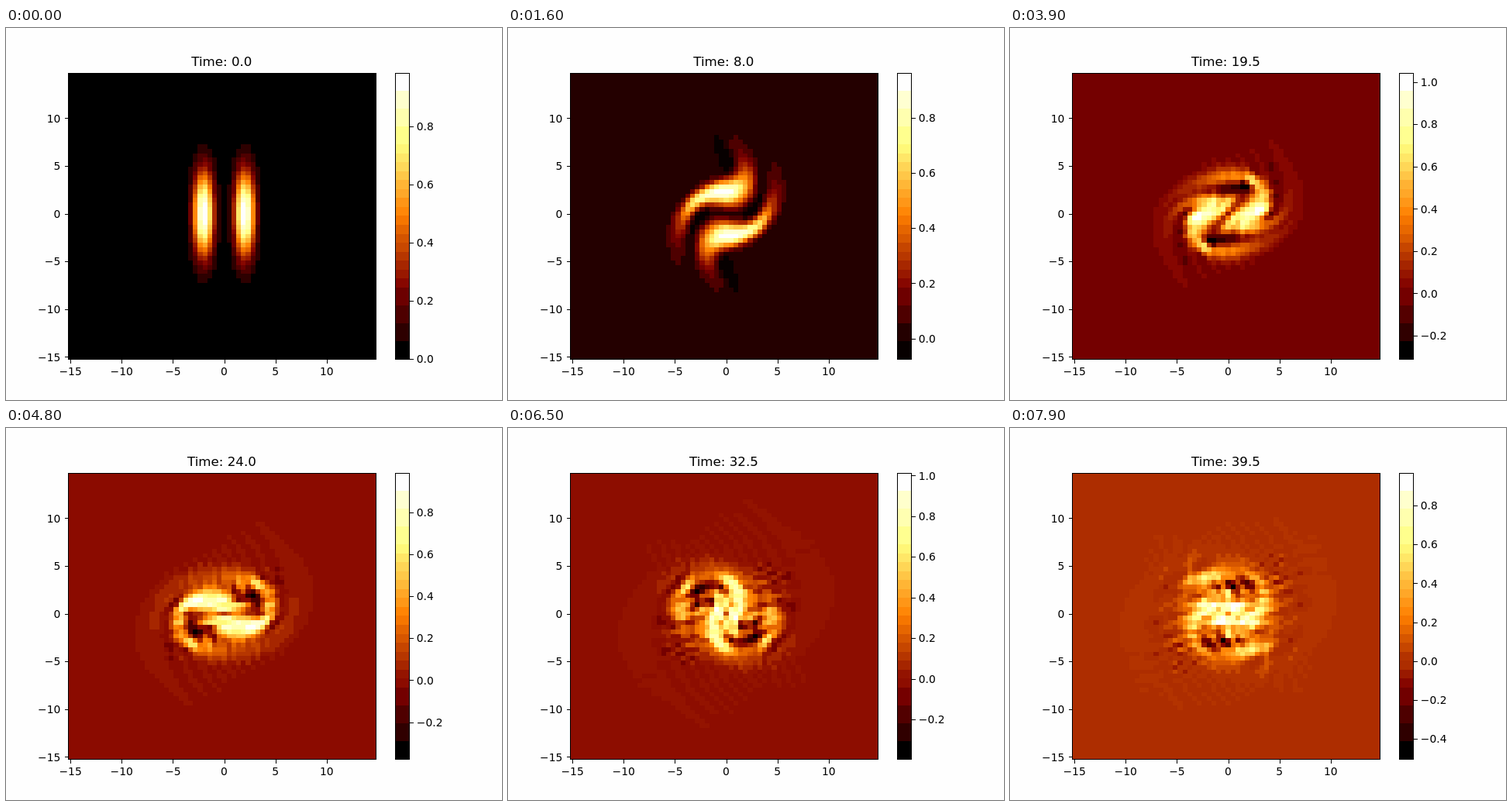
An HTML page with a canvas that plays this animation: 640x480 px, repeating every 8 s.

```html
<!DOCTYPE html>
<html lang="en">
<head>
<meta charset="utf-8">
<title>Vorticity field</title>
<style>
  html, body { margin: 0; width: 640px; height: 480px; overflow: hidden; background: #fefefe; }
  canvas, svg { position: absolute; left: 0; top: 0; display: block; }
  text { font: 13.89px "DejaVu Sans", sans-serif; }
  #title { font-size: 16.67px; }
  path { fill: none; stroke: #000; stroke-width: 1; shape-rendering: crispEdges; }
</style>
</head>
<body>
<canvas id="field" width="640" height="480"></canvas>
<svg width="640" height="480" viewBox="0 0 640 480">
  <path d="M80.5 58.5H477.5V427.5H80.5ZM502.5 58.5H520.5V427.5H502.5Z"/>
  <g id="axes"></g>
  <g id="scale"></g>
  <text id="title" x="278.4" y="49" text-anchor="middle"></text>
</svg>
<script>
const N = 64, SIZE = N * N, LENGTH = 30, DX = LENGTH / N;
const FRAMES = 80, FRAME_MS = 100, FRAME_DT = 0.5, SUBSTEPS = 2, VISCOSITY = 0.001;
const PLOT = { x: 80, y: 57.6, w: 396.8, h: 369.6 };
const BOTTOM = PLOT.y + PLOT.h;
const byId = id => document.getElementById(id);

// --- Fast Fourier transform of one line of N values ---
const cosT = Float64Array.from({ length: N }, (_, i) => Math.cos(2 * Math.PI * i / N));
const sinT = Float64Array.from({ length: N }, (_, i) => Math.sin(2 * Math.PI * i / N));
const reversed = Array.from({ length: N }, (_, i) =>
  parseInt(i.toString(2).padStart(6, "0").split("").reverse().join(""), 2));

function fftLine(re, im, base, stride, sign) {
  for (let i = 0; i < N; i++) {
    const j = reversed[i];
    if (j <= i) continue;
    const a = base + i * stride, b = base + j * stride;
    const tr = re[a], ti = im[a];
    re[a] = re[b]; im[a] = im[b];
    re[b] = tr; im[b] = ti;
  }
  for (let half = 1; half < N; half *= 2) {
    const turn = N / (2 * half);
    for (let k = 0; k < half; k++) {
      const c = cosT[k * turn], s = sign * sinT[k * turn];
      for (let i = k; i < N; i += 2 * half) {
        const a = base + i * stride, b = a + half * stride;
        const tr = re[b] * c - im[b] * s, ti = re[b] * s + im[b] * c;
        re[b] = re[a] - tr; im[b] = im[a] - ti;
        re[a] += tr; im[a] += ti;
      }
    }
  }
}

function fft2(re, im, sign) {
  for (let i = 0; i < N; i++) fftLine(re, im, i * N, 1, sign);
  for (let i = 0; i < N; i++) fftLine(re, im, i, N, sign);
}

// --- Vorticity equation on a periodic square ---
const waveNumber = i => 2 * Math.PI / LENGTH * (i < N / 2 ? i : i - N);
const inverseLaplace = Float64Array.from({ length: SIZE }, (_, n) => {
  const k2 = waveNumber(n % N) ** 2 + waveNumber(Math.floor(n / N)) ** 2;
  return k2 ? -1 / (k2 * SIZE) : 0;
});
const psi = new Float64Array(SIZE), psiIm = new Float64Array(SIZE);

function slope(w, out) {
  psi.set(w);
  psiIm.fill(0);
  fft2(psi, psiIm, -1);
  for (let n = 0; n < SIZE; n++) {
    psi[n] *= inverseLaplace[n];
    psiIm[n] *= inverseLaplace[n];
  }
  fft2(psi, psiIm, 1);
  const grad = 1 / (4 * DX * DX), diffuse = VISCOSITY / (DX * DX);
  for (let j = 0; j < N; j++) {
    const row = j * N, up = (j + 1) % N * N, down = (j + N - 1) % N * N;
    for (let i = 0; i < N; i++) {
      const e = row + (i + 1) % N, v = row + (i + N - 1) % N, n = up + i, s = down + i;
      out[row + i] =
        grad * ((psi[e] - psi[v]) * (w[n] - w[s]) - (psi[n] - psi[s]) * (w[e] - w[v])) +
        diffuse * (w[e] + w[v] + w[n] + w[s] - 4 * w[row + i]);
    }
  }
}

const stage = new Float64Array(SIZE);
const slopes = [0, 1, 2, 3].map(() => new Float64Array(SIZE));

function stepRK4(w, dt) {
  const [a, b, c, d] = slopes;
  const advance = (k, h) => {
    for (let n = 0; n < SIZE; n++) stage[n] = w[n] + h * k[n];
    return stage;
  };
  slope(w, a);
  slope(advance(a, dt / 2), b);
  slope(advance(b, dt / 2), c);
  slope(advance(c, dt), d);
  for (let n = 0; n < SIZE; n++) w[n] += dt / 6 * (a[n] + 2 * b[n] + 2 * c[n] + d[n]);
}

function simulate() {
  const w = Float64Array.from({ length: SIZE }, (_, n) => {
    const x = n % N * DX - LENGTH / 2, y = Math.floor(n / N) * DX - LENGTH / 2;
    const ribbon = cx => Math.exp(-((x - cx) ** 2) - y * y / 20);
    return ribbon(2) + ribbon(-2);
  });
  const states = [w.slice()];
  while (states.length < FRAMES) {
    for (let s = 0; s < SUBSTEPS; s++) stepRK4(w, FRAME_DT / SUBSTEPS);
    states.push(w.slice());
  }
  return states;
}

// --- Colours: black-red-yellow-white ramp, merged into coarse RGB bins ---
const ramp = Array.from({ length: 256 }, (_, i) =>
  [0, 0.5, 1].map(shift => Math.floor(255 * Math.min(1, Math.max(0, 2 * i / 255 - shift)))));
const binOf = ([r, g, b]) => (r >> 5) << 7 | (g >> 4) << 3 | b >> 5;
const levelOf = share => Math.min(255, Math.max(0, Math.floor(share * 256)));

function mergedColours(counts) {
  const bins = new Map();
  const add = (rgb, count) => {
    const key = binOf(rgb), bin = bins.get(key) || [0, 0, 0, 0];
    rgb.forEach((v, c) => bin[c] += v * count);
    bin[3] += count;
    bins.set(key, bin);
  };
  add([0, 0, 0], 3000);          // lines and lettering
  add([255, 255, 255], 150000);  // page
  add([241, 241, 241], 1500);    // soft line edges
  ramp.forEach((rgb, i) => counts[i] && add(rgb, counts[i]));
  return ramp.map(rgb => {
    const bin = bins.get(binOf(rgb));
    return bin ? `rgb(${[0, 1, 2].map(c => Math.floor(bin[c] / bin[3]))})` : "#000";
  });
}

// --- Drawing ---
const ctx = byId("field").getContext("2d");
const edgeX = Array.from({ length: N + 1 }, (_, i) => Math.round(PLOT.x + PLOT.w * i / N));
const edgeY = Array.from({ length: N + 1 }, (_, j) => Math.round(BOTTOM - PLOT.h * j / N));
const BAR = { x: 502, w: 18, top: 58, bottom: 427 };
const snap = v => Math.floor(v + 0.5) + 0.5;
const label = v => String(v).replace("-", "\u2212");
const tickPath = d => `<path d="${d}"/>`;
const textAt = (x, y, anchor, s) => `<text x="${x}" y="${y}" text-anchor="${anchor}">${s}</text>`;
const besideTick = y => Math.round(y + 5.2);

function drawAxes() {
  let out = "";
  for (let v = -15; v <= 10; v += 5) {
    const share = (v + LENGTH / 2 + DX / 2) / LENGTH;
    const x = PLOT.x + PLOT.w * share, y = BOTTOM - PLOT.h * share;
    out += tickPath(`M${snap(x)} 428V432.5M80 ${snap(y)}H75.5`) +
      textAt(x, 448, "middle", label(v)) + textAt(70.3, besideTick(y), "end", label(v));
  }
  byId("axes").innerHTML = out;
}

function drawScale(low, high) {
  let out = "";
  for (let i = Math.ceil(low * 5 - 1e-6); i <= high * 5; i++) {
    const y = BOTTOM - PLOT.h * (i / 5 - low) / (high - low);
    out += tickPath(`M521 ${snap(y)}H525.5`) +
      textAt(529.8, besideTick(y), "start", label(((i || 0) / 5 + 0).toFixed(1)));
  }
  byId("scale").innerHTML = out;
}

function drawFrame(index) {
  const w = states[index];
  let low = Infinity, high = -Infinity;
  for (const v of w) {
    low = Math.min(low, v);
    high = Math.max(high, v);
  }
  const levels = Array.from(w, v => levelOf((v - low) / (high - low)));
  const barLevel = y => levelOf((BOTTOM - y - 0.5) / PLOT.h);
  const counts = new Float64Array(256);
  const eachCell = visit => levels.forEach((level, n) => {
    const i = n % N, j = Math.floor(n / N);
    visit(level, edgeX[i], edgeY[j + 1], edgeX[i + 1] - edgeX[i], edgeY[j] - edgeY[j + 1]);
  });
  const eachBarRow = visit => {
    for (let y = BAR.top; y < BAR.bottom; y++) visit(barLevel(y), BAR.x, y, BAR.w, 1);
  };
  const count = (level, x, y, cw, ch) => counts[level] += cw * ch;
  eachCell(count);
  eachBarRow(count);
  const colours = mergedColours(counts);
  const paint = (level, x, y, cw, ch) => {
    ctx.fillStyle = colours[level];
    ctx.fillRect(x, y, cw, ch);
  };
  eachCell(paint);
  eachBarRow(paint);
  drawScale(low, high);
  byId("title").textContent = "Time: " + (index * FRAME_DT).toFixed(1);
}

const states = simulate();
let shown = 0;
drawAxes();
drawFrame(0);
const start = performance.now();

function tick() {
  const index = Math.floor((performance.now() - start) / FRAME_MS) % FRAMES;
  if (index !== shown) drawFrame(shown = index);
  requestAnimationFrame(tick);
}
requestAnimationFrame(tick);
</script>
</body>
</html>
```
